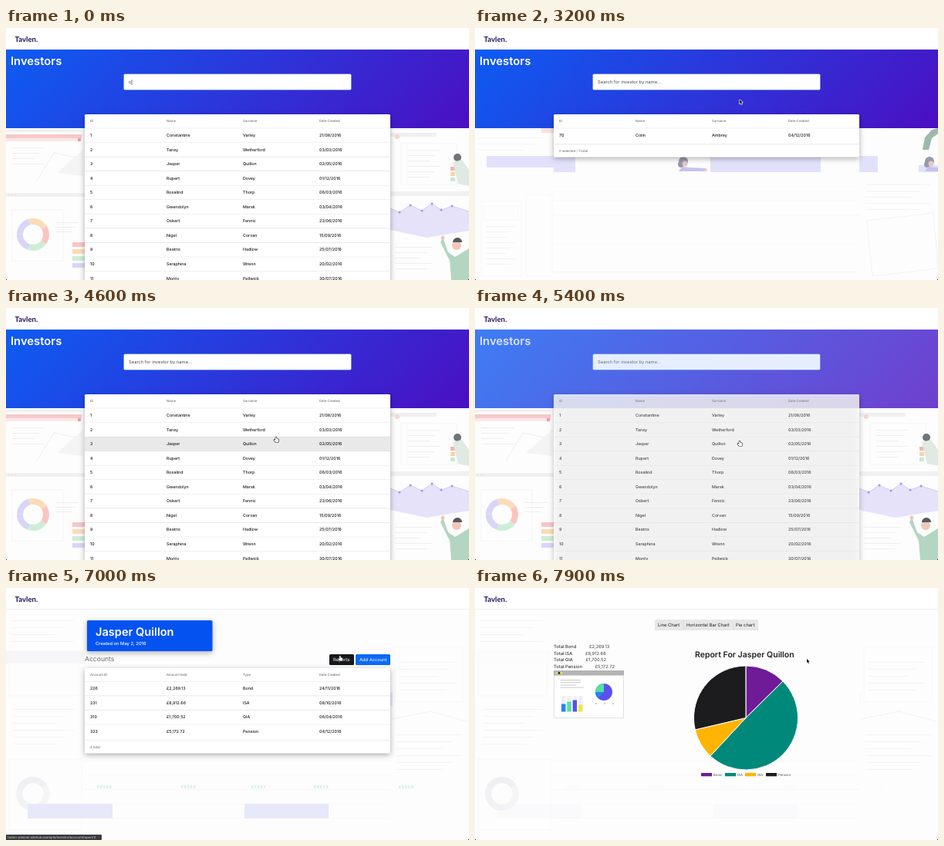
An HTML page with a canvas for the animation above (8 s loop, 600 by 327 pixels).

```html
<!DOCTYPE html>
<html lang="en">
<head>
<meta charset="utf-8">
<title>Investor search</title>
<style>
  html, body { margin: 0; width: 100%; height: 100%; overflow: hidden; background: #fdfdfd; }
  canvas { display: block; width: 600px; height: 327px; }
</style>
</head>
<body>
<canvas></canvas>
<script>
const W = 600, H = 327, LOOP = 8000;
const canvas = document.querySelector('canvas');
const c = canvas.getContext('2d');
const scale = window.devicePixelRatio || 1;
canvas.width = W * scale;
canvas.height = H * scale;
c.scale(scale, scale);
c.textRendering = 'geometricPrecision';

const COLUMNS = [109, 208, 307, 406];
const ROW = 18.55;
const INVESTOR_HEADS = ['ID', 'Name', 'Surname', 'Date Created'];
const INVESTORS = [
  'Constantine Varley 21/08/2016', 'Tansy Wetherford 03/03/2016', 'Jasper Quillon 02/05/2016',
  'Rupert Dovey 01/12/2016', 'Rosalind Thorp 06/03/2016', 'Gwendolyn Marsk 03/04/2016',
  'Osbert Fennic 23/06/2016', 'Nigel Corvan 15/09/2016', 'Beatrix Hadlow 25/07/2016',
  'Seraphina Wrenn 20/02/2016', 'Monty Pellwick 30/07/2016'
].map((line, i) => [i + 1, ...line.split(' ')]);
const MATCH = [['70', 'Colin', 'Ambrey', '04/12/2016']];
const ACCOUNT_HEADS = ['Account ID', 'Amount Held', 'Type', 'Date Created'];
const ACCOUNTS = [
  ['226', '£2,269.13', 'Bond', '24/11/2016'],
  ['231', '£8,912.66', 'ISA', '08/10/2016'],
  ['310', '£1,700.52', 'GIA', '06/04/2016'],
  ['323', '£5,172.72', 'Pension', '04/12/2016']
];
const PIE_COLORS = ['#6f1a96', '#00897b', '#ffb400', '#1c1c1e'];

// [time, x, y] of the pointer tip
const POINTER = [
  [1200, 338, 92], [1600, 328, 71], [2700, 328, 71], [3200, 343, 93], [3500, 347, 112],
  [4200, 352, 172], [4600, 350, 167.5], [5000, 346, 171], [5400, 343, 172.5],
  [5900, 352, 165], [6700, 432, 90], [7000, 433, 88], [7300, 433, 88], [7900, 430, 92]
];

const clamp = v => Math.max(0, Math.min(1, v));
const ramp = (t, from, to) => clamp((t - from) / (to - from));

function rect(x, y, w, h, color, r = 0) {
  c.fillStyle = color;
  c.beginPath();
  c.roundRect(x, y, w, h, r);
  c.fill();
}

function frame(x, y, w, h, color) {
  c.strokeStyle = color;
  c.lineWidth = 0.7;
  c.strokeRect(x, y, w, h);
}

function disc(x, y, r, color, from = 0, to = 2 * Math.PI) {
  c.fillStyle = color;
  c.beginPath();
  if (to - from < 6.28) c.moveTo(x, y);
  c.arc(x, y, r, from, to);
  c.fill();
}

function path(points, color, width = 0) {
  c.beginPath();
  points.forEach(([x, y]) => c.lineTo(x, y));
  if (width) {
    c.strokeStyle = color;
    c.lineWidth = width;
    c.stroke();
  } else {
    c.fillStyle = color;
    c.fill();
  }
}

function text(str, x, y, size, color = '#1c1c1c', weight = 400, family = 'Inter') {
  c.font = `${weight} ${size}px ${family}, sans-serif`;
  c.fillStyle = color;
  c.fillText(str, x, y);
  return c.measureText(str).width;
}

function card(x, y, w, h, color, r = 1.5) {
  c.save();
  c.shadowColor = 'rgba(0,0,0,.32)';
  c.shadowBlur = 7 * scale;
  c.shadowOffsetY = 2 * scale;
  rect(x, y, w, h, color, r);
  c.restore();
}

function table(top, headHeight, heads, rows, footer, hover = -1) {
  const first = top + headHeight, end = first + rows.length * ROW;
  card(102, top, 396, footer ? end + 19 - top : H, '#fff');
  heads.forEach((head, i) => text(head, COLUMNS[i], top + headHeight / 2 + 1.4, 4.3, '#5c5c5c'));
  rows.forEach((row, i) => {
    const y = first + i * ROW;
    if (i === hover) rect(102, y, 396, ROW, '#e9e9e9');
    rect(102, y - 0.3, 396, 0.6, '#e2e2e4');
    row.forEach((cell, k) => text(cell, COLUMNS[k], y + 11, 5.3, '#161616', 500));
  });
  if (footer) {
    rect(102, end + 2, 396, 0.6, '#dcdcde');
    text(footer, 109, end + 12.3, 4.3, '#5c5c5c');
  }
}

function textLines(x, y, w, count, gap, color) {
  for (let i = 0; i < count; i++) rect(x, y + i * gap, w * (1 - (i % 3) * 0.15), 1, color);
}

function donut(x, y, r, colors) {
  colors.forEach((color, i) => {
    const step = 2 * Math.PI / colors.length;
    disc(x, y, r, color, i * step - 0.6, (i + 1) * step - 0.6);
  });
  disc(x, y, r * 0.62, '#fdfdfd');
}

function fullBackdrop() {
  const line = '#efeff0', tints = ['#f8c6c6', '#fbdcb8', '#cdeed4', '#d9d6f8'];
  rect(0, 132, 98, 3, '#f1f1f2');
  rect(0, 138, 98, 5, '#f6c9c9');
  rect(0, 143, 98, 4, '#fbe8e8');
  disc(95, 145, 2.2, '#ee9c9c');
  textLines(8, 155, 42, 4, 7, line);
  path([[40, 198], [62, 162], [100, 170]], line, 1);
  path([[66, 188], [100, 158], [100, 192]], '#f4f4f5');
  rect(0, 214, 102, 5, '#f1f1f2');
  [4, 8, 12].forEach(x => disc(x, 216.5, 1, '#dfdfe1'));
  frame(8, 236, 66, 66, line);
  donut(35, 268, 21, ['#f9c5c0', '#cdeed6', '#d8d5f8', '#d8d5f8', '#fbdcb8']);
  textLines(64, 252, 30, 3, 6, line);
  tints.forEach((tint, i) => rect(86, 278 + i * 9, 16, 6, tint));

  rect(498, 136, 60, 5, '#f0f0f1');
  disc(507, 141, 3, '#f7d6cf');
  frame(512, 150, 72, 53, line);
  textLines(520, 158, 42, 6, 7, line);
  ['#f5b2b2', '#fad3a8', '#c7e9d0'].forEach((tint, i) => rect(576, 180 + i * 7, 6, 5, tint));
  disc(585, 168, 5, '#70747a');
  path([[579, 174], [591, 171], [600, 184], [600, 205], [586, 202]], '#dfeae3');
  rect(498, 212, 102, 6, '#f1f1f2');
  const ridge = [[498, 234], [510, 239], [524, 230], [539, 237], [552, 228], [564, 236], [578, 231], [600, 238]];
  path([...ridge, [600, 263], [545, 272], [498, 262]], '#e5e2fa');
  path(ridge, '#c9c3f3', 0.8);
  ridge.slice(1, 7).forEach(([x, y]) => disc(x, y, 1.5, '#9c94e6'));
  textLines(504, 284, 48, 5, 7, line);
  path([[566, 272], [573, 291], [582, 297], [600, 286], [600, 327], [577, 327], [575, 302], [563, 278]], '#b4d5c1');
  disc(584, 282, 6, '#efc8b8');
  disc(585, 278, 6, '#55595e', Math.PI, 2 * Math.PI);
  disc(566, 272, 2.5, '#efc8b8');
}

function person(x, y) {
  disc(x, y, 6, '#9698ab');
  disc(x - 3, y + 4, 4, '#9698ab');
  disc(x + 2, y + 3, 3.5, '#e7c7c1');
  path([[x - 6, y + 13], [x - 2, y + 7], [x + 9, y + 8], [x + 29, y + 9], [x + 29, y + 13]], '#c5c3ed');
  disc(x + 29, y + 11, 2, '#f2cabc');
}

function filteredBackdrop() {
  const line = '#f3f3f5', lilac = '#e2e1fb';
  rect(86, 130, 16, 6, '#fae2d8');
  textLines(4, 142, 84, 3, 8, line);
  rect(15, 166, 87, 15, lilac);
  rect(102, 168, 28, 19, lilac);
  rect(305, 168, 143, 19, lilac);
  rect(498, 166, 24, 21, lilac);
  rect(575, 178, 25, 9, lilac);
  person(270, 173);
  person(589, 173);
  path([[580, 158], [583, 142], [592, 132], [600, 130], [600, 137], [592, 143], [588, 158]], '#9eb9ab');
  frame(8, 225, 52, 97, line);
  frame(12, 231, 44, 18, line);
  textLines(14, 257, 38, 8, 7, line);
  frame(66, 216, 34, 106, line);
  textLines(506, 203, 84, 5, 8, line);
  path([[508, 250], [594, 240], [600, 312], [515, 322], [508, 250]], line, 1);
  for (let y = 205; y < H; y += ROW) rect(102, y, 396, 0.6, '#f5f5f6');
}

function accountBackdrop(strength) {
  const line = '#f3f3f5', lilac = '#e8e8fb';
  c.globalAlpha = 1;
  textLines(6, 42, 82, 4, 9, line);
  frame(4, 82, 90, 58, line);
  textLines(10, 157, 78, 6, 9, line);
  frame(504, 76, 88, 72, line);
  textLines(510, 96, 72, 5, 9, line);
  path([[500, 170], [550, 160], [600, 174]], line, 1);
  textLines(506, 190, 85, 6, 9, line);
  frame(4, 222, 94, 92, line);
  donut(35, 267, 22, ['#f5f5f6', '#f2f2f5', '#efeff4']);
  for (let y = 224; y < H; y += ROW) rect(102, y, 396, 0.6, '#f5f5f6');
  c.globalAlpha = strength;
  rect(28, 280, 110, 19, lilac);
  rect(309, 280, 109, 19, lilac);
  rect(0, 82, 102, 16, '#f5f5fa');
  rect(498, 136, 3, 17, lilac);
  [127, 236, 327, 408, 518].forEach(x => {
    for (let i = 0; i < 5; i++) rect(x - 9 + i * 4, 256, 2.6, 4, '#dcf3ea');
  });
  c.globalAlpha = 1;
}

function searchQuery(t) {
  const typed = [0, 100, 300, 400, 600].filter(at => t >= at).length;
  const erased = t < 2300 ? 0 : Math.floor((t - 2200) / 100);
  return 'colin'.slice(0, Math.max(0, typed - erased));
}

function investorsPage(t, alpha, hover) {
  c.globalAlpha = alpha;
  const sweep = c.createLinearGradient(124.5, -96.5, 475.5, 254.5);
  sweep.addColorStop(0, '#0d5cf2');
  sweep.addColorStop(1, '#4b0fc2');
  rect(0, 28, W, 102, sweep);
  text('Investors', 6, 48, 14.8, '#fff', 600);
  rect(152.4, 59.4, 295.2, 21.2, '#8fc0ff', 2);
  rect(153, 60, 294, 20, '#fff', 1.5);
  const query = searchQuery(t);
  if (query) {
    const width = text(query, 159, 72.2, 5.8, '#333');
    rect(159.4 + width, 67, 0.6, 7, '#222');
  } else {
    text('Search for investor by name...', 159, 72.2, 5.8, '#4c4c50');
  }
  const filtered = t >= 900 && t < 3400;
  table(112, 18, INVESTOR_HEADS, filtered ? MATCH : INVESTORS, filtered && '0 selected / 1 total', hover);
  c.globalAlpha = 1;
}

function accountsPage(t, alpha) {
  c.globalAlpha = alpha;
  card(105, 42, 162.5, 40, '#0453f0');
  text('Jasper Quillon', 116, 62, 14.6, '#fff', 600);
  text('Created on May 2, 2016', 116, 74, 5.8, '#fff', 500);
  text('Accounts', 102, 95, 8.6, '#666');
  rect(419, 86, 32, 14, '#17181c', 1.5);
  text('Reports', 424, 95, 5.9, '#fff');
  rect(453, 86, 45, 14, '#0b69f5', 1.5);
  text('Add Account', 458, 95, 5.8, '#fff');
  table(104, 17.3, ACCOUNT_HEADS, ACCOUNTS, '4 total');
  if (t > 6700) {
    rect(0, 320, 124, 7, '#3b3c3f', 1);
    text('tavlen-planner.sitehub.example/investor/account/report/3', 2, 325, 4.2, '#d4d4d6');
  }
  c.globalAlpha = 1;
}

function dashboardPicture() {
  rect(102, 107, 91, 62, '#fff');
  frame(102.4, 107.4, 90.2, 61.2, '#d5d5d7');
  rect(102, 107, 91, 6.5, '#b4b4b5');
  ['#f4e43c', '#222', '#f4e43c'].forEach((color, i) => disc(106 + i * 3, 110.3, 1.4, color));
  [26, 26, 20, 30].forEach((w, i) => rect(111, 119 + i * 3.2, w, 1, '#c9c9cc'));
  disc(167, 135, 11, '#5a50ee');
  disc(167, 135, 11, '#55e0a2', Math.PI, 1.5 * Math.PI);
  disc(167, 135, 11, '#2487e8', 0.75 * Math.PI, Math.PI);
  [157, 168, 179].forEach(x => disc(x, 150, 0.7, '#777'));
  const bars = [[10, '#2487e8'], [13, '#55e0a2'], [15, '#5a50ee'], [9, '#f4e43c']];
  bars.forEach(([h, color], i) => {
    const x = 112 + i * 7.3;
    rect(x, 140, 5.5, 20.5, '#f0f0f3');
    rect(x, 160.5 - h, 5.5, h, color);
  });
}

function reportPage(t, alpha) {
  c.globalAlpha = alpha;
  rect(233, 41, 134, 14, '#e7e7e8', 1);
  [['Line Chart', 237], ['Horizontal Bar Chart', 274], ['Pie chart', 338]]
    .forEach(([label, x]) => text(label, x, 50.2, 5.8));
  rect(270, 41, 0.5, 14, '#dadadc');
  rect(334, 41, 0.5, 14, '#dadadc');
  ACCOUNTS.forEach(([, amount, type], i) => {
    const width = text('Total ' + type, 102, 78.4 + i * 8.5, 5.8);
    text(amount, 118.7 + width, 78.4 + i * 8.5, 5.8, '#444');
  });
  dashboardPicture();
  text('Report For Jasper Quillon', 285, 90, 10.5, '#222', 600);

  const values = ACCOUNTS.map(row => +row[1].replace(/[£,]/g, ''));
  const total = values.reduce((a, b) => a + b);
  const grown = 1 - (1 - ramp(t, 7200, 8000)) ** 4;
  let angle = -Math.PI / 2;
  values.forEach((value, i) => {
    const next = angle + value / total * 2 * Math.PI * grown;
    disc(351, 168.5, 67.5, PIE_COLORS[i], angle, next);
    c.closePath();
    c.strokeStyle = '#fff';
    c.lineWidth = 1;
    c.stroke();
    angle = next;
  });
  [293, 324, 350, 377].forEach((x, i) => {
    rect(x, 240, 14, 4.3, PIE_COLORS[i]);
    text(ACCOUNTS[i][2], x + 16, 243.8, 4.3, '#555');
  });
  c.globalAlpha = 1;
}

function pointerAt(t) {
  const next = POINTER.findIndex(p => p[0] > t);
  if (next === 0) return null;
  if (next < 0) return POINTER.at(-1).slice(1);
  const [t0, x0, y0] = POINTER[next - 1], [t1, x1, y1] = POINTER[next];
  const k = ramp(t, t0, t1), ease = k * k * (3 - 2 * k);
  return [x0 + (x1 - x0) * ease, y0 + (y1 - y0) * ease];
}

function drawPointer([x, y], hand) {
  const outline = hand
    ? [[-.8, 0], [.5, 0], [.7, 2.3], [3, 2.8], [3.4, 4], [2.8, 6.5], [-.9, 6.5], [-2.8, 4], [-2.2, 3.2], [-.8, 4]]
    : [[0, 0], [0, 5], [1.2, 4], [2, 6], [3, 5.6], [2.1, 3.7], [3.7, 3.6]];
  const shape = outline.map(([dx, dy]) => [x + dx, y + dy]);
  path([...shape, shape[0]], hand ? '#222' : '#fff', 1.2);
  path(shape, hand ? '#fff' : '#111');
}

function draw(t) {
  rect(0, 0, W, H, '#fdfdfd');
  if (t >= 5700) accountBackdrop(1 - 0.85 * ramp(t, 7100, 7400));
  else if (t >= 900 && t < 3400) filteredBackdrop();
  else fullBackdrop();

  const pointer = pointerAt(t);
  const row = pointer ? Math.floor((pointer[1] - 130) / ROW) : -1;
  const overRow = t >= 3400 && t < 5700 && row >= 0;

  if (t < 5700) investorsPage(t, 1 - ramp(t, 5320, 5720), overRow && t < 5350 ? row : -1);
  else if (t < 7200) accountsPage(t, ramp(t, 5700, 6050));
  else reportPage(t, ramp(t, 7150, 7400));

  rect(0, 0, W, 27.5, '#fff');
  rect(0, 27.3, W, 0.7, '#ececee');
  text('Tavlen.', 11.5, 18, 9.6, '#24135f', 700, 'Lato');
  if (pointer) drawPointer(pointer, overRow || (t >= 6650 && t < 7200));
  rect(0, H - 1, 1, 1, '#222');
  rect(W - 1, H - 1, 1, 1, '#222');
}

const start = performance.now();
function tick() {
  draw((performance.now() - start) % LOOP);
  requestAnimationFrame(tick);
}
tick();
</script>
</body>
</html>
```
